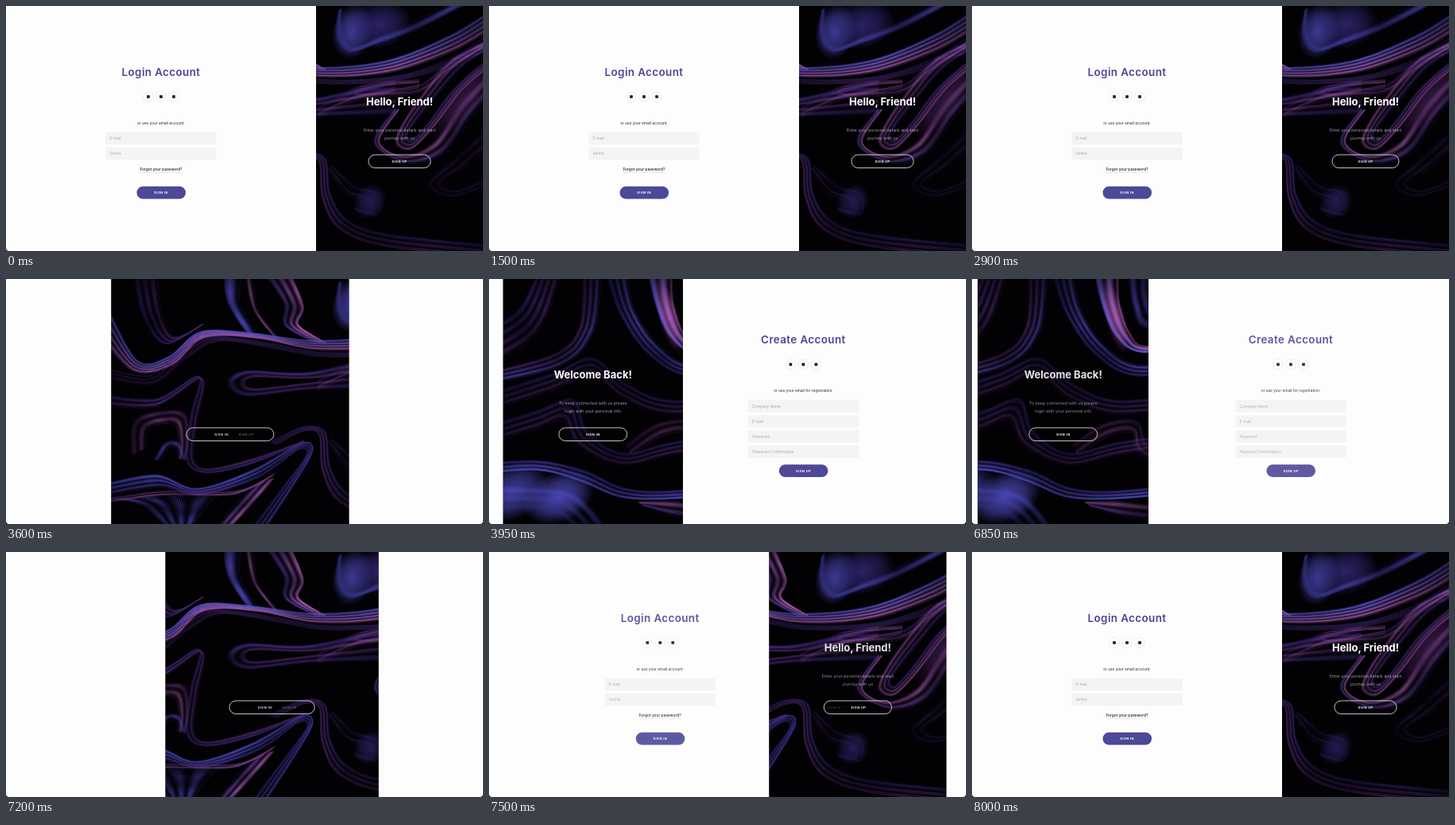
An HTML page with a canvas for the animation above (8050 ms loop, 600x308 px).

```html
<!DOCTYPE html>
<html lang="en">
<head>
<meta charset="utf-8">
<title>Login and sign up</title>
<style>
html, body { margin: 0; width: 100%; height: 100%; overflow: hidden; background: #fefdfe; }
#stage { position: relative; width: 600px; height: 308px; overflow: hidden; }
#stage > * { position: absolute; top: 0; left: 0; }
#panel { width: 600px; height: 308px; background: #000; }
#panel canvas { position: absolute; top: 0; left: 0; }
svg { display: block; font-family: Inter, "Open Sans", sans-serif; }
.title { font-size: 13.4px; font-weight: 600; letter-spacing: .4px; fill: #4d4497; text-anchor: middle; }
.note { font-size: 4.75px; fill: #25242c; text-anchor: middle; }
.hint { font-size: 4.75px; fill: #a7a8ae; }
.forgot { font-size: 4.85px; font-weight: 500; fill: #1e1d26; text-anchor: middle; }
.label { font-size: 3.9px; font-weight: 700; letter-spacing: .45px; fill: #fff; text-anchor: middle; }
.hello { font-size: 13px; font-weight: 700; fill: #fff; text-anchor: middle; }
.para { font-size: 5.4px; font-weight: 300; fill: #c9c4d2; text-anchor: middle; }
.ring { fill: #fff; stroke: #e3e2e9; stroke-width: .7; }
</style>
</head>
<body>
<div id="stage">
  <svg id="forms" width="600" height="308" viewBox="0 0 600 308">
    <g id="login"></g>
    <g id="create"></g>
  </svg>
  <div id="panel">
    <canvas id="right" width="600" height="308"></canvas>
    <canvas id="left" width="700" height="308"></canvas>
  </div>
  <svg width="600" height="308" viewBox="0 0 600 308">
    <g id="mid">
      <g id="hello">
        <text class="hello" y="125">Hello, Friend!</text>
        <text class="para" y="158">Enter your personal details and start</text>
        <text class="para" y="167.6">journey with us</text>
      </g>
      <g id="welcome">
        <text class="hello" y="125">Welcome Back!</text>
        <text class="para" y="158">To keep connected with us please</text>
        <text class="para" y="167.6">login with your personal info</text>
      </g>
      <rect id="pill" y="187" height="16.5" rx="8.25" fill="none" stroke="#f4f2f8" stroke-width=".8"/>
      <text class="label" id="in" y="196.6">SIGN IN</text>
      <text class="label" id="up" y="196.6">SIGN UP</text>
    </g>
    <path d="M0 304V308H4A4 4 0 0 1 0 304ZM600 304V308H596A4 4 0 0 0 600 304Z" fill="#111"/>
  </svg>
</div>
<script>
const $ = id => document.getElementById(id);
const LOOP = 8050, TRAVEL = 390;

// ---- forms -------------------------------------------------------------
const textAt = (cls, x, y, s) => `<text class="${cls}" x="${x}" y="${y}">${s}</text>`;

function form(title, titleY, ringY, note, noteY, fields, fieldY, button, buttonY) {
  let out = textAt('title', 195, titleY, title);
  for (const x of [179, 195, 211]) {
    out += `<circle class="ring" cx="${x}" cy="${ringY}" r="6.3"/>`;
    out += `<rect x="${x - 1.8}" y="${ringY - 1.8}" width="3.6" height="3.6" fill="#15141a"/>`;
  }
  out += textAt('note', 195, noteY, note);
  fields.forEach((name, i) => {
    const y = fieldY + i * 19;
    out += `<rect x="125.3" y="${y}" width="139.4" height="15.6" fill="#f3f4f6"/>`;
    out += textAt('hint', 130.5, y + 9.5, name);
  });
  out += `<rect x="164.5" y="${buttonY}" width="61.5" height="15.8" rx="7.9" fill="#4d4897"/>`;
  return out + textAt('label', 195.2, buttonY + 9.3, button);
}

$('login').innerHTML =
  form('Login Account', 88, 114, 'or use your email account:', 149,
    ['E-mail', 'Senha'], 158.7, 'SIGN IN', 226.8) +
  textAt('forgot', 195, 206.7, 'Forgot your password?') +
  '<path d="M168 209.4H222" stroke="#d5d4dc" stroke-width=".6"/>';
$('create').innerHTML =
  form('Create Account', 81.3, 107.4, 'or use your email for registration:', 142.3,
    ['Company Name', 'E-mail', 'Password', 'Password Confirmation'], 152.2, 'SIGN UP', 233.3);

// ---- silk artwork ------------------------------------------------------
const points = s => s.split(' ').map(p => p.split(',').map(Number));

function trace(g, pts) {
  g.beginPath();
  g.moveTo(...pts[0]);
  for (let i = 0; i < pts.length - 1; i++) {
    const p0 = pts[i - 1] || pts[i], p1 = pts[i], p2 = pts[i + 1], p3 = pts[i + 2] || p2;
    g.bezierCurveTo(
      p1[0] + (p2[0] - p0[0]) / 6, p1[1] + (p2[1] - p0[1]) / 6,
      p2[0] - (p3[0] - p1[0]) / 6, p2[1] - (p3[1] - p1[1]) / 6, p2[0], p2[1]);
  }
}

const INDIGO = [48, 38, 112], BLUE = [84, 82, 205], PINK = [176, 94, 178], PLUM = [82, 40, 104];

// A sheet of threads blended from edge a to edge b.
function silk(g, a, b, c1, c2, { n = 12, folds = 2, glow = .8, phase = .4 } = {}) {
  a = points(a);
  b = points(b);
  for (let i = 0; i < n; i++) {
    const k = i / (n - 1);
    const pts = a.map(([x, y], j) => [x + (b[j][0] - x) * k, y + (b[j][1] - y) * k]);
    const wave = Math.sin(k * Math.PI * folds + phase) ** 2;
    const rgb = c1.map((v, j) => Math.round(v + (c2[j] - v) * k));
    const [x0, y0] = pts[0], [x1, y1] = pts[pts.length - 1];
    const tone = g.createLinearGradient(x0, y0, x1, y1);
    [.55, 1, .6, 1, .5].forEach((m, j) =>
      tone.addColorStop(j / 4, `rgba(${rgb},${glow * m * (.12 + .88 * wave)})`));
    g.strokeStyle = tone;
    g.lineWidth = 1.5;
    trace(g, pts);
    g.stroke();
  }
}

function blob(g, x, y, rx, ry, turn, rgb, alpha) {
  g.save();
  g.translate(x, y);
  g.rotate(turn);
  g.scale(rx, ry);
  const tone = g.createRadialGradient(0, 0, 0, 0, 0, 1);
  tone.addColorStop(0, `rgba(${rgb},${alpha})`);
  tone.addColorStop(.55, `rgba(${rgb},${alpha * .6})`);
  tone.addColorStop(1, `rgba(${rgb},0)`);
  g.fillStyle = tone;
  g.fillRect(-1, -1, 2, 2);
  g.restore();
}

function paintRight(g) {
  g.fillStyle = '#020104';
  g.fillRect(0, 0, 600, 308);
  g.filter = 'blur(.5px)';
  // upper curtains
  silk(g, '160,-5 172,48 200,82 245,58', '190,-5 196,40 212,72 250,56', INDIGO, PLUM, { n: 16, folds: 3, glow: .6 });
  silk(g, '274,-5 279,30 304,70', '296,-5 295,32 318,72', BLUE, INDIGO, { n: 18, folds: 1, glow: .75 });
  silk(g, '302,-5 311,38 338,74', '309,-5 318,40 344,75', PINK, PLUM, { n: 5, folds: 1 });
  silk(g, '326,-5 349,30 350,58 388,80', '358,-5 374,35 368,58 402,80', INDIGO, PINK, { n: 18, folds: 2.5 });
  blob(g, 436, 32, 26, 36, .25, BLUE, .75);
  blob(g, 470, 24, 42, 30, -.3, INDIGO, .9);
  silk(g, '418,6 415,38 432,58 470,46 520,28 610,-20', '424,0 428,32 440,48 470,36 520,15 590,-20', BLUE, INDIGO, { n: 12, folds: 1, glow: .6 });
  // long wave
  silk(g, '128,35 165,102 205,97 245,66 310,68 390,77 480,68 560,36 610,5',
    '122,80 163,117 210,108 250,74 320,75 390,89 480,84 560,58 610,30', BLUE, PINK, { n: 18, folds: 4 });
  silk(g, '128,112 180,120 215,92 260,72 340,82 400,92 490,88 560,65 610,32',
    '128,126 185,132 228,100 270,78 340,88 400,98 490,94 560,75 610,45', INDIGO, PLUM, { n: 8, folds: 3, glow: .65 });
  // tongue
  silk(g, '490,92 380,117 302,115 279,131 302,147 380,139 490,136',
    '490,106 390,124 314,123 300,131 314,138 380,131 490,118', INDIGO, PLUM, { n: 14, folds: 1.5, glow: .85 });
  silk(g, '520,92 460,97 428,108 460,114 520,104', '520,96 465,102 442,108 465,110 520,98', PLUM, PINK, { n: 5, folds: 2 });
  // right-hand loop
  silk(g, '610,42 560,68 530,102 500,145 490,172 510,180 540,150 575,105 610,75',
    '610,52 572,80 544,112 516,146 506,162 512,166 532,144 562,104 610,62', PINK, INDIGO, { n: 16, folds: 3 });
  silk(g, '392,126 445,104 515,100 555,72 610,38', '392,140 450,116 518,110 560,80 610,46', INDIGO, PINK, { n: 8, folds: 2, glow: .6 });
  silk(g, '610,82 570,125 540,170 500,188 470,170 495,130', '610,112 584,142 552,186 505,198 462,172 488,130', PINK, INDIGO, { n: 14, folds: 2, glow: .75 });
  blob(g, 575, 118, 18, 62, .65, PLUM, .6);
  silk(g, '610,150 560,195 530,225 560,240 610,225', '610,175 575,205 550,222 570,230 610,212', INDIGO, PLUM, { n: 9, folds: 2, glow: .45 });
  // spike and lower wave
  silk(g, '128,146 190,150 242,122 232,170 226,226 250,244 310,232 375,205',
    '128,160 190,160 247,126 241,180 237,226 256,238 312,225 375,203', INDIGO, PLUM, { n: 10, folds: 2 });
  silk(g, '158,222 163,176 222,166 230,200 226,228', '176,212 180,188 210,182 218,204 216,226', PLUM, PINK, { n: 14, folds: 2, glow: .6 });
  silk(g, '186,228 200,206 218,206 226,226', '196,226 204,213 213,213 218,225', BLUE, INDIGO, { n: 6, folds: 1 });
  silk(g, '128,256 190,246 240,263 310,240 372,206 386,216 364,256 326,315',
    '128,272 195,262 245,272 320,250 366,216 377,222 350,258 306,315', BLUE, INDIGO, { n: 16, folds: 3 });
  silk(g, '338,250 312,280 280,315', '316,256 292,280 262,315', PINK, INDIGO, { n: 16, folds: 2, glow: .75 });
  silk(g, '128,276 170,284 205,315', '270,270 252,286 232,315', INDIGO, BLUE, { n: 40, folds: 4, glow: .6 });
  silk(g, '128,275 200,266 290,266 340,243', '128,281 200,272 285,271 335,248', PLUM, PINK, { n: 5, folds: 2 });
  // lower right threads
  silk(g, '330,206 372,186 402,192 408,235 430,268 480,286 610,300',
    '340,208 374,191 394,196 398,240 420,280 480,302 610,315', INDIGO, PLUM, { n: 9, folds: 2.5, glow: .75 });
  blob(g, 458, 246, 20, 24, .6, INDIGO, .7);
  silk(g, '410,200 440,225 470,235 470,262 440,258', '405,205 425,236 452,246 456,258 436,252', INDIGO, PLUM, { n: 7, folds: 2, glow: .5 });
}

function paintLeft(g) {
  g.fillStyle = '#020104';
  g.fillRect(0, 0, 700, 308);
  g.translate(100, 0);
  g.filter = 'blur(.5px)';
  // upper folds
  silk(g, '-100,70 -45,40 -20,-5', '-100,120 -20,70 10,-5', INDIGO, PLUM, { n: 26, folds: 4, glow: .65 });
  silk(g, '-100,122 0,95 34,60 38,-5', '-100,135 10,110 52,66 62,-5', PLUM, BLUE, { n: 16, folds: 3, glow: .6 });
  silk(g, '68,-5 84,42 118,92 170,122 260,112', '94,-5 104,40 132,82 176,108 260,98', INDIGO, BLUE, { n: 18, folds: 3, glow: .65 });
  silk(g, '122,-5 130,30 147,70 180,92 260,82', '150,-5 152,32 166,70 188,85 260,74', BLUE, PINK, { n: 20, folds: 2, phase: .9, glow: .95 });
  blob(g, 146, 46, 13, 50, -.28, PINK, .6);
  silk(g, '164,-5 169,32 186,62 260,58', '190,-5 192,26 206,42 260,40', BLUE, INDIGO, { n: 16, folds: 2, glow: .7 });
  // middle folds
  silk(g, '-100,150 0,118 50,98 92,130 150,152 260,142', '-100,172 0,140 48,120 88,150 150,170 260,158', INDIGO, PLUM, { n: 14, folds: 3, glow: .6 });
  silk(g, '-100,190 -20,165 28,150 44,190 88,218 150,205 260,188', '-100,212 -25,190 12,178 32,210 88,234 155,220 260,206', INDIGO, PLUM, { n: 14, folds: 3, glow: .65 });
  silk(g, '92,208 130,182 175,178 192,210 260,222', '100,222 138,198 168,194 180,222 260,236', PLUM, PINK, { n: 12, folds: 2, glow: .45 });
  // lower folds
  blob(g, 8, 274, 48, 32, -.4, BLUE, .85);
  blob(g, -50, 268, 50, 34, -.5, BLUE, .75);
  silk(g, '-100,232 -20,228 40,240 90,262 150,266 260,254', '-100,246 -20,240 36,254 86,274 150,276 260,266', INDIGO, BLUE, { n: 14, folds: 2.5 });
  silk(g, '-100,262 -30,262 30,272 70,315', '-100,300 -40,292 0,296 26,315', BLUE, INDIGO, { n: 20, folds: 3, glow: .6 });
  silk(g, '108,280 150,280 205,284 260,272', '116,286 160,300 205,304 260,298', PINK, INDIGO, { n: 14, folds: 2, glow: .65 });
}

paintRight($('right').getContext('2d'));
paintLeft($('left').getContext('2d'));

// ---- motion ------------------------------------------------------------
const slope = (p, q) => (q[1] - p[1]) / (q[0] - p[0]);

// Smooth curve through [time, value] keys that never overshoots.
function track(keys, t) {
  const last = keys.length - 1;
  if (t <= keys[0][0]) return keys[0][1];
  if (t >= keys[last][0]) return keys[last][1];
  const i = keys.findIndex(k => k[0] > t) - 1;
  const tangent = j => {
    if (j === 0 || j === last) return 0;
    const s0 = slope(keys[j - 1], keys[j]), s1 = slope(keys[j], keys[j + 1]);
    return s0 * s1 <= 0 ? 0 : 2 * s0 * s1 / (s0 + s1);
  };
  const [t0, v0] = keys[i], [t1, v1] = keys[i + 1], d = t1 - t0, u = (t - t0) / d;
  const ease = u * u * (3 - 2 * u);
  return v0 + (v1 - v0) * ease +
    d * u * (1 - u) * ((1 - u) * tangent(i) - u * tangent(i + 1));
}

const LEFT = [[3150, 390], [3400, 284], [3600, 133], [3800, 50], [3950, 18], [4050, 7], [4200, 0],
  [6800, 0], [7000, 74], [7200, 200], [7400, 316], [7550, 365], [7650, 381], [7800, 390]];
const RIGHT = [[3150, 600], [3400, 563], [3600, 432], [3800, 309], [3950, 244], [4050, 222], [4200, 210],
  [6800, 210], [7000, 322], [7200, 468], [7400, 552], [7550, 583], [7650, 593], [7800, 600]];
const LOGIN = [[3120, 1], [3400, 0], [7300, 0], [7550, 1]];
const CREATE = [[3680, 0], [3900, 1], [6800, 1], [7060, 0]];
const PILL = [[2600, .372], [2800, .4], [3300, .4], [3600, .368], [3950, .38], [4200, .372],
  [6500, .372], [6700, .4], [7200, .4], [7550, .38], [7800, .372]];
const SLIDE = [[3150, 0], [3600, .65], [3900, 1], [6850, 1], [7200, .71], [7550, 0]];

const clamp = v => Math.max(0, Math.min(1, v));

function draw(t) {
  const left = track(LEFT, t), right = track(RIGHT, t), width = right - left;
  const login = track(LOGIN, t), create = track(CREATE, t), slide = track(SLIDE, t);
  const formX = 210 * (1 - left / TRAVEL);

  for (const [id, alpha] of [['login', login], ['create', create]]) {
    $(id).setAttribute('transform', `translate(${formX} 0)`);
    $(id).setAttribute('opacity', alpha);
  }
  $('hello').setAttribute('opacity', login);
  $('welcome').setAttribute('opacity', create);

  $('panel').style.clipPath = `inset(0 ${600 - right}px 0 ${left}px)`;
  const drift = Math.min(80, left * 4.45);
  $('left').style.transform = `translateX(${drift - 100}px)`;
  $('left').style.opacity = clamp((110 - left) / 80);

  $('mid').setAttribute('transform', `translate(${(left + right) / 2} 0)`);
  const pill = width * track(PILL, t);
  $('pill').setAttribute('x', -pill / 2);
  $('pill').setAttribute('width', pill);
  $('in').setAttribute('x', -31 * (1 - slide));
  $('up').setAttribute('x', 31 * slide);
  $('in').setAttribute('opacity', Math.sqrt(clamp(slide)));
  $('up').setAttribute('opacity', clamp(1 - slide));
}

const start = performance.now();
function tick() {
  draw((performance.now() - start) % LOOP);
  requestAnimationFrame(tick);
}
tick();
</script>
</body>
</html>
```
